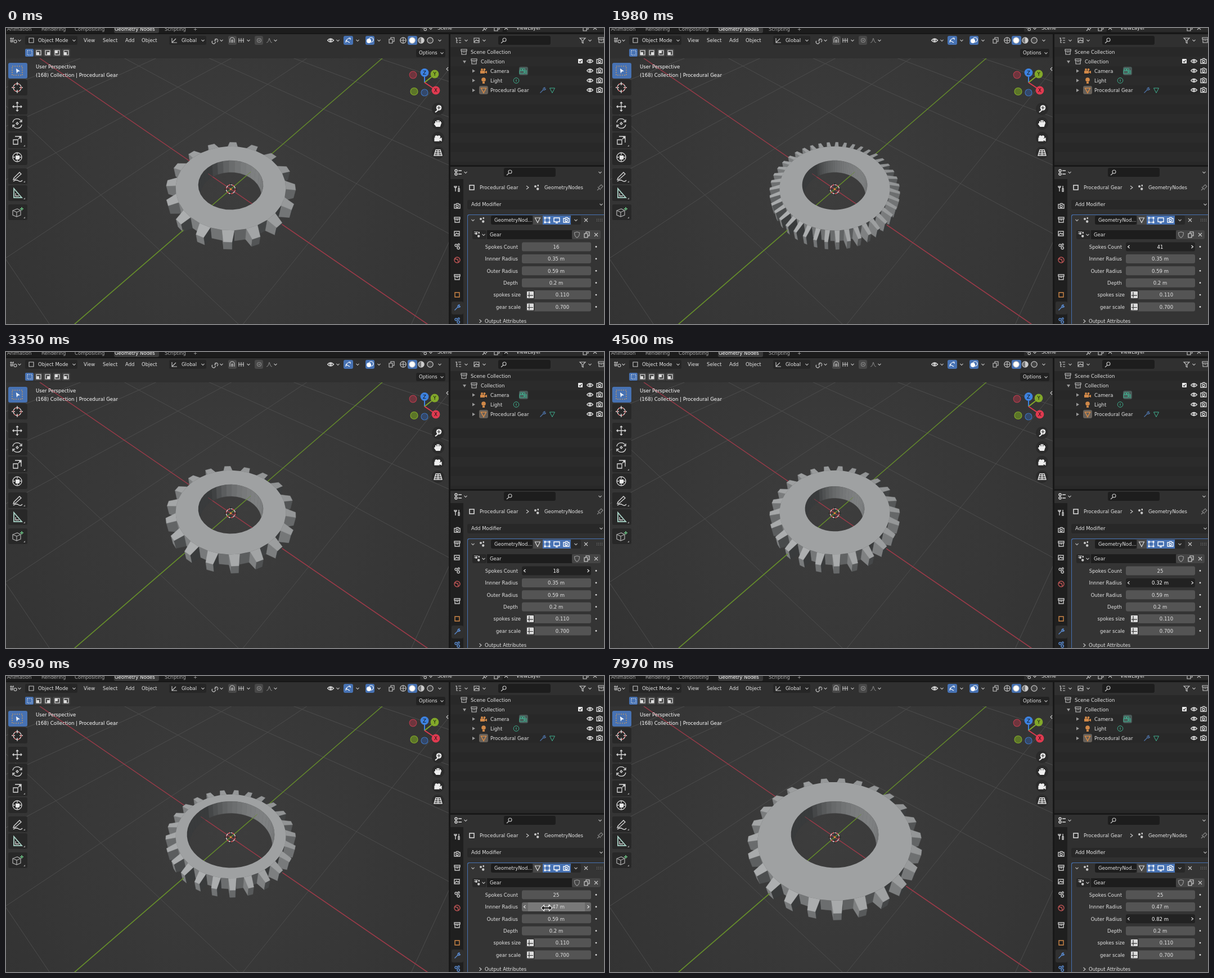
An HTML page with a canvas that plays this animation: 1063x527 px, repeating every 8 s.

```html
<!DOCTYPE html>
<html lang="en">
<head>
<meta charset="utf-8">
<title>Procedural gear</title>
<style>
html, body { margin: 0; width: 100%; height: 100%; overflow: hidden; background: #303030; }
canvas { display: block; }
</style>
</head>
<body>
<canvas id="stage" width="1063" height="527"></canvas>
<script>
const W = 1063, H = 527, LOOP = 8000;
const screen2d = document.getElementById('stage').getContext('2d');
const base = document.createElement('canvas');
base.width = W; base.height = H;
let g = base.getContext('2d');

const TEXT = '#e4e4e4', BLUE = '#4772b3', ICON = '#c8c8c8', ORANGE = '#d08848', GREEN = '#3fb08f';
const RED_AXIS = '#983a48', GREEN_AXIS = '#658c2b';

// ---- 2D helpers ----
function box(x, y, w, h, color, r = 0) {
  g.fillStyle = color;
  g.beginPath(); g.roundRect(x, y, w, h, r); g.fill();
}
function text(s, x, y, align = 'left', color = TEXT, size = 8.5) {
  g.font = size + 'px "DejaVu Sans", sans-serif';
  g.textAlign = align; g.textBaseline = 'middle'; g.fillStyle = color;
  g.fillText(s, x, y + 1);
}
function draw(x, y, path, color = ICON, fill = false, width = 1.1) {
  g.save(); g.translate(x, y);
  g.lineWidth = width; g.strokeStyle = g.fillStyle = color;
  const p = new Path2D(path);
  fill ? g.fill(p) : g.stroke(p);
  g.restore();
}
function circle(x, y, r, fill, stroke, width = 1.2) {
  g.beginPath(); g.arc(x, y, r, 0, 7);
  if (fill) { g.fillStyle = fill; g.fill(); }
  if (stroke) { g.strokeStyle = stroke; g.lineWidth = width; g.stroke(); }
}
const chevron = (x, y) => draw(x, y, 'M-2.5-1.2L0 1.5L2.5-1.2');
const cross = (x, y) => draw(x, y, 'M-3-3L3 3M3-3L-3 3');
const P = {
  square: 'M-4-4H4V4H-4Z',
  eye: 'M-5.5 0Q0-6 5.5 0Q0 6-5.5 0M-1.5 0A1.5 1.5 0 1 0 1.5 0A1.5 1.5 0 1 0-1.5 0',
  camera: 'M-5-3H-2L-1-4.5H2L3-3H5V4H-5ZM-2 .5A2 2 0 1 0 2 .5A2 2 0 1 0-2 .5',
  movie: 'M-6 0H2V5H-6ZM2 2L6 0V5L2 3M-5-2A2 2 0 1 0-1-2A2 2 0 1 0-5-2M-.5-2A2 2 0 1 0 3.5-2A2 2 0 1 0-.5-2',
  tri: 'M-4.5-4H4.5L0 4.5Z',
  list: 'M-5-4H-2M0-4H5M-3-4V4H-1M-3 0H-1M1 0H5M1 4H5',
  picture: 'M-5-4H4V4H-5ZM-5 3L-1-1L1 1L2 0L4 2',
  nodes: 'M-4-2A2 2 0 1 0 0-2A2 2 0 1 0-4-2M0 2.5A2.2 2.2 0 1 0 4.4 2.5A2.2 2.2 0 1 0 0 2.5M1.5-3.5A1.3 1.3 0 1 0 4-3.5A1.3 1.3 0 1 0 1.5-3.5',
  wrench: 'M-4.5 4.5L1-1M1-1A3 3 0 0 1 4-5L3-2.5L5-1.5L5.5-3A3 3 0 0 1 1-1',
  search: 'M-1-1A3 3 0 1 0 5-1A3 3 0 1 0-1-1M0 1.5L-4 5',
  copy: 'M-4-2H2V5H-4ZM-1-2V-5H5V2H2',
  filter: 'M-5-4H5L1 0V5L-1 4V0Z',
  stack: 'M-5-5H5V-2H-5ZM-4-2V4H4V-2M-1.5 0H1.5',
  shield: 'M0-5L4.5-3.5Q4.5 3 0 5.5Q-4.5 3-4.5-3.5Z',
  pin: 'M-5 5L-1 1M-4-1L1 4M-2-1L2-5L5-2L1 2',
  toggles: 'M-6-3A2 2 0 1 0-2-3A2 2 0 1 0-6-3M0-3H6M-6 3A2 2 0 1 0-2 3A2 2 0 1 0-6 3M0 3H6',
  tools: 'M-3-5V-1M-5-5V-3Q-3 0-1-3V-5M-3-1V5M3-5V0M2 0H4V5H2Z'
};

// ---- 3D projection: u right, v toward the viewer, z up ----
const FOCAL = 510, DIST = 3.17, SE = 0.771, CE = 0.637, CX = 399.5, CY = 287;
const AZ = 41.7 * Math.PI / 180, CA = Math.cos(AZ), SA = Math.sin(AZ);
const EYE = [0, DIST * CE, DIST * SE];
const depth = ([, v, z]) => DIST - v * CE - z * SE;
function project(p) {
  const k = FOCAL / depth(p);
  return [CX + p[0] * k, CY + (p[1] * SE - p[2] * CE) * k];
}
const ground = (x, y) => project([x * CA + y * SA, x * SA - y * CA, 0]);
function segment(a, b, color, width) {
  g.strokeStyle = color; g.lineWidth = width;
  g.beginPath(); g.moveTo(...a); g.lineTo(...b); g.stroke();
}
function axes(from, to, toY = to, width = 1.4) {
  segment(ground(from, 0), ground(to, 0), RED_AXIS, width);
  segment(ground(0, -to), ground(0, toY), GREEN_AXIS, width);
}

// ---- gear ----
const sub = (a, b) => a.map((x, i) => x - b[i]);
const dot = (a, b) => a.reduce((s, x, i) => s + x * b[i], 0);
const mean = pts => [0, 1, 2].map(i => pts.reduce((s, p) => s + p[i], 0) / pts.length);
function shade([u, v, z]) {
  const n = [u, z * CE - v * SE, v * CE + z * SE];
  const key = dot(n, [-0.408, 0.347, 0.844]), gloss = dot(n, [-0.2125, 0.181, 0.96]);
  const light = 0.045 + 0.34 * Math.max(0, key + 0.03) + 0.1 * Math.max(0, gloss) ** 16;
  const c = Math.round(255 * (1.055 * light ** (1 / 2.4) - 0.055));
  return `rgb(${c - 3},${c - 1},${c})`;
}
function trace(pts) {
  pts.map(project).forEach((p, i) => i ? g.lineTo(...p) : g.moveTo(...p));
  g.closePath();
}
// Returns a face whose normal points away from the inside point, or nothing if it is hidden.
function makeFace(pts, inside) {
  const a = sub(pts[1], pts[0]), b = sub(pts[2], pts[0]), mid = mean(pts);
  let n = [a[1] * b[2] - a[2] * b[1], a[2] * b[0] - a[0] * b[2], a[0] * b[1] - a[1] * b[0]];
  const len = Math.hypot(...n) * Math.sign(dot(n, sub(mid, inside)));
  n = n.map(x => x / len);
  return dot(n, sub(EYE, mid)) > 0 ? [{ pts, color: shade(n), far: depth(mid) }] : [];
}
function paint({ pts, color }) {
  g.beginPath(); trace(pts);
  g.fillStyle = g.strokeStyle = color; g.lineWidth = 0.5;
  g.fill(); g.stroke();
}
function drawGear(count, inner, outer) {
  const HALF = 0.1, LENGTH = 0.11, TAPER = 0.7, step = Math.PI / count;
  const at = (r, i, z) => [r * Math.cos(AZ + i * step), r * Math.sin(AZ + i * step), z];
  const wall = (r, i) => [at(r, i, HALF), at(r, i + 1, HALF), at(r, i + 1, -HALF), at(r, i, -HALF)];
  const ring = r => Array.from({ length: 2 * count }, (_, i) => at(r, i, HALF));
  const outside = [], hole = [];
  for (let i = 0; i < 2 * count; i++) {
    const innerWall = wall(inner, i), root = wall(outer, i);
    hole.push(...makeFace(innerWall, mean(innerWall).map(x => 2 * x)));
    if (i % 2) { outside.push(...makeFace(root, [0, 0, 0])); continue; }
    const mid = mean(root), push = at(LENGTH, i + 0.5, 0);
    const tip = root.map(p => p.map((x, k) => mid[k] + (x - mid[k]) * TAPER + push[k]));
    const inside = mean([...root, ...tip]);
    outside.push(...makeFace(tip, inside));
    for (let k = 0; k < 4; k++) {
      const m = (k + 1) % 4;
      outside.push(...makeFace([root[k], root[m], tip[m], tip[k]], inside));
    }
  }
  outside.sort((a, b) => b.far - a.far).forEach(paint);

  g.save();
  g.beginPath(); trace(ring(inner)); g.clip();
  g.drawImage(base, 0, 0);
  hole.forEach(paint);
  g.globalAlpha = 0.8;
  axes(-inner, inner, inner, 1);
  g.restore();

  g.beginPath(); trace(ring(outer)); trace(ring(inner));
  g.fillStyle = shade([0, 0, 1]); g.fill('evenodd');
  segment(ground(outer + LENGTH, 0), ground(3, 0), RED_AXIS, 1.4);
  segment(ground(0, -outer - LENGTH), ground(0, -3), GREEN_AXIS, 1.4);
}
function drawCursor3D() {
  circle(CX, CY, 8, null, '#e8e8e8', 1.3);
  g.setLineDash([4, 4]); circle(CX, CY, 8, null, '#d0303a', 1.3); g.setLineDash([]);
  draw(CX, CY, 'M0-11V-5M0 5V11M-11 0H-5M5 0H11', '#1c1c1c', false, 1);
  circle(CX, CY, 1.8, '#e08a3c');
}

// ---- static interface ----
function drawViewport() {
  const bg = g.createRadialGradient(394, 280, 0, 394, 280, 520);
  bg.addColorStop(0, '#3d3d3d'); bg.addColorStop(1, '#323232');
  box(0, 0, 788, H, bg);
  for (let k = -8; k <= 6; k++) {
    if (!k) continue;
    segment(ground(k, (SA * k - 4.5) / CA), ground(k, 14), '#4c4c4c', 1);
    segment(ground(-14, -k), ground((4.5 - CA * k) / SA, -k), '#4c4c4c', 1);
  }
  axes(-14, 5, 14);
}
function drawViewportTools() {
  text('User Perspective', 53, 68.5, 'left', '#fff');
  text('(168) Collection | Procedural Gear', 53, 84, 'left', '#fff', 8.6);

  const tools = [
    [76, 'M-2-4L5 1L1 1.5L-1 5Z'], [106, 'M-10 0H-4M4 0H10M0-10V-4M0 4V10'],
    [140, 'M-8 0H8M0-8V8M-6-2L-8 0L-6 2M6-2L8 0L6 2M-2-6L0-8L2-6M-2 6L0 8L2 6'],
    [170, 'M-8-2A8 8 0 0 1 7-4M8-7V-3H4M8 2A8 8 0 0 1-7 4M-8 7V3H-4M-2 0L0-2L2 0L0 2Z'],
    [200, 'M-7-1H1V7H-7ZM-4-7H7V4M2-2L6-6M3-6H6V-3'],
    [230, 'M-8 0A8 8 0 1 0 8 0A8 8 0 1 0-8 0M0-7V-4M0 4V7M-7 0H-4M4 0H7'],
    [264, 'M-6 3L4-7L7-4L-3 5L-7 6ZM-7 9Q-2 5 2 8T9 7'], [294, 'M-6-8V8H8ZM-3 0V5H3'],
    [328, 'M-8-3L0-6L6-3V5L-1 8L-8 5ZM-8-3L-1 0V8M-1 0L6-3M8-9V-3M5-6H11']
  ];
  tools.forEach(([y, path], i) => {
    box(4, y - 14, 34, 28, i ? '#282828' : BLUE, 3);
    draw(20, y, path, i === 0 ? '#fff' : i === 8 ? '#a8a8a8' : '#d8d8d8', i === 0, 1.3);
    if (i > 3 && i !== 5) draw(34, y + 11, 'M0-3V0H-3Z', '#999', true);
  });
  box(17, 227, 7, 7, '#eee');
  g.setLineDash([2, 2]);
  draw(20, 76, 'M-9-8H9V8H-9Z', '#e0a050');
  g.setLineDash([]);
  circle(20, 106, 7, null, '#e0e0e0', 1.3);
  g.setLineDash([3, 4]); circle(20, 106, 7, null, '#c85050', 1.3); g.setLineDash([]);
  draw(20, 294, 'M-6-8V8H8Z', '#a0c8bc', false, 1.8);
  draw(28, 322, 'M0-3V3M-3 0H3', '#58b070', false, 1.5);

  draw(744, 97, 'M0 0V-12', '#3d82e0', false, 2);
  draw(744, 97, 'M0 0L14-11', '#82a82a', false, 2);
  draw(744, 97, 'M0 0L15 10', '#e03a50', false, 2);
  circle(723.5, 83.5, 6.3, '#6e353d', '#b03c4c');
  circle(725.5, 113, 6.5, '#5c7528', '#82a82a');
  circle(744, 115, 6, '#33486a', '#3d70b8');
  [['Z', 744, 79.5, '#3d82e0'], ['Y', 762, 82, '#82a82a'], ['X', 764, 111, '#e03a50']].forEach(([s, x, y, c]) => {
    circle(x, y, 7.4, c); text(s, x, y, 'center', '#111', 8.5);
  });
  const nav = ['M0 2L-5 6', 'M-4 0V-4M-1.3 0V-6M1.3 0V-6M4 0V-4M-6 1L-3 5H3L5-1H-4Z', P.movie,
    'M-4-5H4L7 5H-7ZM-5-1.5H5M-6 2H6M0-5V5'];
  nav.forEach((path, i) => {
    const y = 144 + 26 * i;
    circle(768, y, 11, '#2b2b2b');
    if (i === 1 || i === 2) draw(768, y, path, '#eee', true);
    draw(768, y, path, '#eee', false, i < 2 ? 2 : 1.3);
  });
  circle(769.5, 142, 4.8, '#eee'); draw(769.5, 142, 'M-3 0H3M0-3V3', '#2b2b2b');
  draw(784, 73, 'M2-3L-1 0L2 3');
}
function drawHeader() {
  box(0, 11, 788, 43, '#303030');
  box(0, 0, W, 10, '#1c1c1c'); box(0, 9, W, 2, '#161616');
  box(192, -6, 80, 15, '#3a3a3a', 3);
  [['Animation', 2], ['Rendering', 63], ['Compositing', 122], ['Geometry Nodes', 193], ['Scripting', 282], ['+', 333]]
    .forEach(([s, x]) => text(s, x, 2, 'left', x === 193 ? '#fff' : '#a8a8a8'));
  box(736, -6, 147, 13, '#2a2a2a', 2); box(890, -6, 173, 13, '#2a2a2a', 2);
  text('Scene', 767, -0.5); text('ViewLayer', 907, -0.5);
  draw(743, 0, P.nodes); chevron(755, 1); draw(852, 0, P.pin);
  [872, 1030].forEach(x => { draw(x, 0, P.copy); cross(x + 17, 0); });

  draw(13, 22, 'M-6-3H1M-6 1H0M-4-5V4M0-5L-2 4M1 2A2.5 2.5 0 1 0 6 2A2.5 2.5 0 1 0 1 2'); chevron(24, 22);
  box(34, 14, 93, 16, '#262626', 3);
  draw(45, 22, P.square); text('Object Mode', 57, 22); chevron(121, 22);
  [['View', 138], ['Select', 172], ['Add', 212], ['Object', 241]].forEach(([s, x]) => text(s, x, 22));
  box(290, 14, 66, 16, '#262626', 3);
  draw(299, 22, 'M-4-4V4H5M-4 4L3-3'); text('Global', 312, 22);
  draw(372, 22, 'M-5 1A3 3 0 1 0 0 2M-1-1A3 3 0 1 1 3 3M-2 1L2-1');
  box(395, 14, 15, 16, '#484848', 3);
  draw(402, 22, 'M-4 1V-1A4 4 0 0 1 4-1V4M-4 1V4M-1 4V0A1 1 0 0 1 1 0V4');
  draw(418, 22, 'M-4-4V4M0-4V4M4-4V4M-5 0H5');
  box(442, 14, 15, 16, '#484848', 3); circle(450, 22, 3.5, null, '#888'); circle(450, 22, 1.2, '#888');
  draw(468, 22, 'M-5 4Q-2 4-1-1T1-1Q2 4 5 4', '#888');
  draw(577, 22, P.eye, '#ddd', false, 1.4);
  box(600, 14, 17, 16, BLUE, 3); draw(608, 22, 'M-4 4Q-4-3 4-4M1-4H4V-1M-4 0L3 4', '#fff');
  box(639, 14, 16, 16, BLUE, 3); circle(645, 23, 4, '#fff'); circle(649, 21, 4, null, '#fff');
  draw(685, 22, P.copy);
  box(714, 14, 17, 16, BLUE, 3);
  [706, 722, 738, 754].forEach((x, i) => circle(x, 22, 5.2, [null, '#fff', '#777', '#444'][i], ICON));
  draw(706, 22, 'M-5 0H5M0-5V5');
  draw(738, 22, 'M0-5A5 5 0 0 1 0 5Z', '#ccc', true);
  [350, 383, 431, 479, 590, 625, 663, 771].forEach(x => chevron(x, 22));

  [42, 58, 74, 91, 107].forEach((x, i) => {
    box(x - 8, 37, 15, 14, i ? '#424242' : BLUE, 2);
    if (!i) g.setLineDash([1.5, 1.5]);
    draw(x, 44, P.square, '#eee');
    g.setLineDash([]);
    if (i) box(x - (i === 2 ? 1 : 4), i === 3 ? 40 : 43, 5, 5, '#ddd');
  });
  box(729, 37, 52, 15, '#222', 3); text('Options', 734, 44); chevron(775, 44.5);
}
function drawOutliner() {
  box(787, 11, 3, H, '#181818');
  box(790, 11, 273, 23, '#303030');
  for (let i = 0; i < 13; i++) box(790, 34 + 17 * i, 273, 17, i % 2 ? '#2b2b2b' : '#282828');
  draw(804, 22, P.list); draw(837, 22, P.picture);
  box(875, 14, 93, 16, '#1d1d1d', 3); draw(884, 22, P.search);
  draw(1025, 22, P.filter); draw(1058, 22, P.stack);
  [818, 850, 1038].forEach(x => chevron(x, 22));
  draw(814, 43, P.stack); text('Scene Collection', 826, 42.5, 'left', TEXT, 8.6);
  draw(815, 60, 'M-3-2H3L0 3Z', '#999', true);
  draw(832, 60, P.stack); text('Collection', 844, 59.5, 'left', TEXT, 8.6);
  box(1017, 55, 8, 8, '#eee', 1); draw(1021, 59, 'M-2 0L-.5 2L2.5-2', '#222');
  [['Camera', 76.5], ['Light', 93.5], ['Procedural Gear', 111]].forEach(([s, y]) => {
    draw(831, y, 'M-2-3L3 0L-2 3Z', '#999', true); text(s, 861, y);
  });
  [59, 76, 93.5, 110.5].forEach(y => {
    draw(1038, y, P.eye, '#ddd', false, 1.3); draw(1055, y, P.camera, '#ddd', false, 1.3);
  });
  draw(849, 76, P.movie, ORANGE, true);
  box(912, 69, 16, 15, '#4a5a58', 3); draw(919, 76, P.movie, GREEN);
  circle(849, 92, 3.8, ORANGE); box(847, 96, 4, 3, ORANGE);
  circle(907, 93.5, 4.8, null, GREEN, 1); draw(907, 93.5, 'M0-2V2', GREEN);
  box(841, 103, 16, 15, '#66605a', 3); draw(849, 111, P.tri, ORANGE, false, 1.6);
  draw(954, 111, P.wrench, '#5078b0'); draw(971, 111, P.tri, GREEN, false, 1);
}
function drawProperties() {
  box(787, 244, 276, 3, '#181818');
  box(790, 247, 273, 280, '#303030');
  box(790, 269, 23, 258, '#1f1f1f'); box(792, 487, 21, 23, '#303030', 3);
  draw(804, 257, P.toggles, '#ddd', false, 1.5); chevron(817, 257);
  box(885, 249, 92, 16, '#1d1d1d', 3); draw(894, 257, P.search); chevron(1056, 257);
  [[286, P.tools], [317, P.camera], [342, P.stack], [366, P.picture], [389, P.nodes],
   [413, 'M-5 0A5 5 0 1 0 5 0A5 5 0 1 0-5 0M-4-2L1-1L2 4', '#c05555'], [444, P.stack],
   [475, P.square, ORANGE], [498, P.wrench, '#5a8bd0'], [521, P.nodes, '#5a8bd0']]
    .forEach(([y, path, color]) => draw(802, y, path, color, false, 1.4));
  draw(828, 284, P.square, '#ddd', false, 1.5); text('Procedural Gear', 842, 283.5);
  draw(927, 284, 'M-2-3L2 0L-2 3'); draw(943, 284, P.nodes, ICON, true);
  text('GeometryNodes', 957, 283.5); draw(1056, 284, P.pin, '#888');
  box(820, 306, 250, 17, '#282828', 3); text('Add Modifier', 827, 314); chevron(1058, 314);

  box(820, 332, 260, 220, BLUE, 3); box(821, 333, 260, 220, '#343434', 3);
  chevron(830, 342); draw(846, 342, P.nodes, ICON, true);
  box(862, 334, 74, 16, '#1d1d1d', 3); text('GeometryNod...', 868, 342);
  box(937, 334, 17, 16, '#484848'); box(954, 334, 50, 16, BLUE); box(1004, 334, 18, 16, '#282828', 3);
  draw(945, 342, P.tri, '#ddd'); draw(962, 342, P.square, '#fff');
  [[-4, -4], [4, -4], [-4, 4], [4, 4]].forEach(([x, y]) => box(960.5 + x, 340.5 + y, 3, 3, '#fff'));
  draw(979, 342, 'M-5-4H5V3H-5ZM-2 5H2', '#fff', false, 1.4); draw(996, 342, P.camera, '#fff', false, 1.3);
  chevron(1013, 342); cross(1031, 342);
  for (let i = 0; i < 8; i++) box(1050 + 3 * (i % 4), 340 + 3 * (i >> 2), 1, 1, '#999');
  box(829, 360, 25, 16, '#282828', 3); draw(838, 368, P.nodes, ICON, true); draw(837, 366, 'M-5-3H2M-5 0H0'); chevron(849, 368);
  box(855, 360, 151, 16, '#1d1d1d'); text('Gear', 860, 368);
  box(1006, 360, 51, 16, '#454545', 3);
  draw(1015, 368, P.shield, '#999'); draw(1032, 368, P.copy, '#ddd'); cross(1049, 368);
  [['Spokes Count'], ['Innner Radius'], ['Outer Radius'], ['Depth', '0.2 m'], ['spokes size', '0.110'], ['gear scale', '0.700']]
    .forEach(([label, value], i) => {
      const y = rowY(i);
      text(label, i > 3 ? 915 : 910, y, 'right'); circle(1049, y, 1.4, '#ddd');
      if (!value) return;
      const x = i > 3 ? 924 : 917;
      box(x, y - 8, 1040 - x, 16, '#545454', 3);
      text(value, i > 3 ? 989 : 978, y, 'center');
      if (i > 3) {
        box(924, y - 8, 16, 16, '#3a3a3a', 3); box(926, y - 6, 12, 12, '#ddd', 1);
        draw(932, y, 'M-2-5V5M-5 1H5', '#333', false, 1.2);
      }
    });
  draw(843, 522, 'M-1.5-3L2 0L-1.5 3'); text('Output Attributes', 851, 522);
}
const rowY = i => 389.5 + 21.4 * i;

// ---- timeline ----
// Each change: start, end, number of steps, from, to.
const SPOKES = [[1230, 1980, 12, 16, 41], [2240, 3350, 17, 41, 18], [3480, 3750, 5, 18, 25]];
const INNER = [[4360, 4500, 3, 0.35, 0.32], [4640, 5800, 17, 0.32, 0.54], [6200, 6690, 8, 0.54, 0.47]];
const OUTER = [[7560, 7970, 7, 0.59, 0.82]];
function valueAt(changes, t) {
  let value = changes[0][3];
  for (const [start, end, steps, from, to] of changes) {
    if (t < start) break;
    const k = Math.min(steps, Math.floor((t - start) / (end - start) * (steps - 1) + 1e-6) + 1);
    value = from + (to - from) * k / steps;
  }
  return value;
}
const DRAGS = [[1030, 3820], [4160, 6950], [7360, 8000]];
// Pointer moves: start, arrival, hidden at, start point, end point.
const MOVES = [[200, 960, 1030, 911, 427, 952, 390], [3820, 3960, 4160, 952, 390, 961, 412], [6950, 7360, 7360, 961, 413, 960, 432]];
function pointerAt(t) {
  const move = MOVES.find(m => t >= m[0] && t < m[2]);
  if (!move) return null;
  const [start, end, , x0, y0, x1, y1] = move, k = Math.min(1, Math.floor((t - start) / 70) * 70 / (end - start));
  return [x0 + (x1 - x0) * k, y0 + (y1 - y0) * k];
}
function drawField(i, label, dragged, hovered) {
  const y = rowY(i);
  box(917, y - 8, 123, 16, dragged ? '#222' : hovered ? '#686868' : '#545454', 3);
  if (hovered) box(928, y - 8, 101, 16, '#797979');
  if (dragged || hovered) {
    draw(922, y, 'M1.5-2.5L-1.5 0L1.5 2.5', '#eee'); draw(1035, y, 'M-1.5-2.5L1.5 0L-1.5 2.5', '#eee');
  }
  text(label, 978, y, 'center', dragged ? '#fff' : TEXT);
}
function render(t) {
  g.drawImage(base, 0, 0);
  const count = Math.round(valueAt(SPOKES, t));
  const inner = +valueAt(INNER, t).toFixed(2), outer = +valueAt(OUTER, t).toFixed(2);
  drawGear(count, inner, outer);
  drawCursor3D();
  const pointer = pointerAt(t);
  [`${count}`, `${inner} m`, `${outer} m`].forEach((label, i) => {
    const dragged = t >= DRAGS[i][0] && t < DRAGS[i][1];
    const hovered = !!pointer && pointer[0] > 917 && Math.abs(pointer[1] - rowY(i)) < 9;
    drawField(i, label, dragged, hovered);
  });
  if (pointer) {
    const arrow = 'M-9 0L-5-4V-1.3H5V-4L9 0L5 4V1.3H-5V4Z';
    draw(...pointer, arrow, '#fff', false, 2); draw(...pointer, arrow, '#111', true);
  }
}

drawViewport();
drawHeader();
drawViewportTools();
drawOutliner();
drawProperties();
g = screen2d;
const begin = performance.now();
function tick() {
  render((performance.now() - begin) % LOOP);
  requestAnimationFrame(tick);
}
tick();
</script>
</body>
</html>
```
